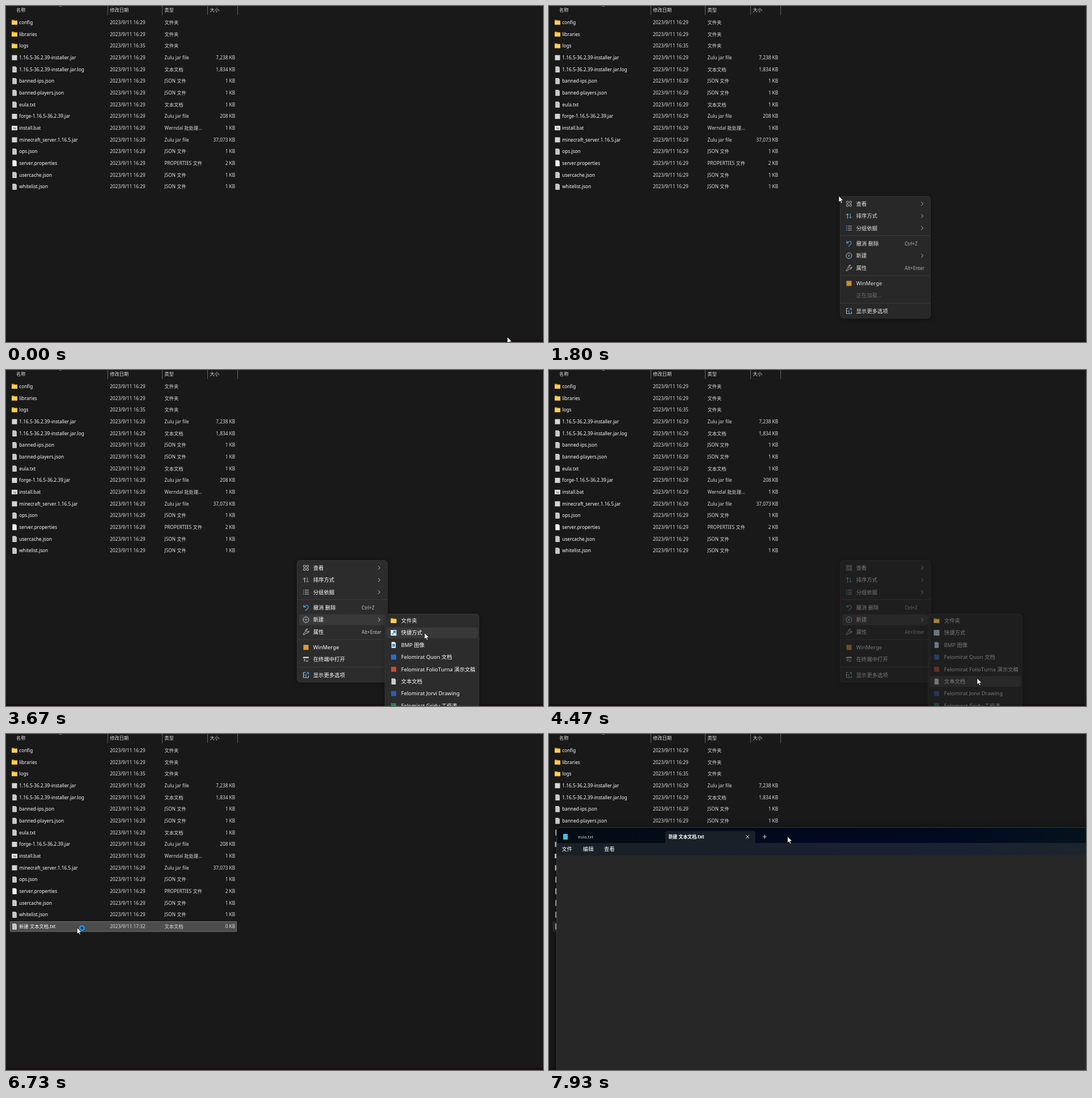
Animation, 947 px wide and 592 px high, one loop 8 s. Source, as an HTML page with a canvas:

```html
<!DOCTYPE html>
<html>
<head>
<meta charset="utf-8">
<style>
html, body { margin: 0; width: 100%; height: 100%; overflow: hidden; background: #191919; }
canvas { display: block; }
</style>
</head>
<body>
<canvas id="stage" width="947" height="592"></canvas>
<script>
const ctx = document.getElementById('stage').getContext('2d');
const LOOP = 8000, STEP = 1000 / 15;
const FONT = '"Noto Sans", "Noto Sans CJK SC", "Noto Sans CJK", sans-serif';
const BLUE = '#4cb8f0', LIGHT = '#d0d0d0';
ctx.fontKerning = 'none';

// ---------- helpers ----------
function text(str, x, y, size, color = '#fff', align = 'left', weight = 400) {
  ctx.font = `${weight} ${size}px ${FONT}`;
  ctx.fillStyle = color;
  ctx.textAlign = align;
  ctx.fillText(str, x, y + size * 0.36);
}
function box(x, y, w, h, fill, radius = 0, border) {
  ctx.beginPath();
  ctx.roundRect(x, y, w, h, radius);
  if (fill) { ctx.fillStyle = fill; ctx.fill(); }
  if (border) { ctx.strokeStyle = border; ctx.lineWidth = 1; ctx.stroke(); }
}
function path(x, y, d, stroke, fill, width = 1) {
  const shape = new Path2D(d);
  ctx.save();
  ctx.translate(x, y);
  if (fill) { ctx.fillStyle = fill; ctx.fill(shape); }
  if (stroke) { ctx.strokeStyle = stroke; ctx.lineWidth = width; ctx.stroke(shape); }
  ctx.restore();
}
const clamp01 = v => Math.max(0, Math.min(1, v));
const easeOut = p => 1 - (1 - clamp01(p)) ** 3;

// ---------- icons, centred on x, y ----------
const square = color => (x, y) => box(x - 4.5, y - 4.5, 9, 9, color);
const icons = {
  folder(x, y) {
    path(x, y, 'M-5-4.5H-1L0-3.5H5V4H-5Z', null, '#e0a526');
    box(x - 5, y - 2.5, 10, 6.5, '#ffd04f', 0.8);
  },
  blank(x, y) { path(x, y, 'M-3.7-5.3H1.8L3.8-3.3V5.2H-3.7Z', null, '#f2f2f2'); },
  doc(x, y) {
    path(x, y, 'M-3.7-5.3H1.8L3.8-3.3V5.2H-3.7Z', null, '#dcdcdc');
    path(x, y, 'M-2.3-3H2M-2.3-1H2.3M-2.3 1H2.3M-2.3 3H2.3', '#a2a2a2', null, 0.8);
  },
  jar: square('#d5d5d5'),
  bat(x, y) {
    box(x - 5, y - 4, 10, 8, '#e4e4e4', 0.5);
    box(x - 4, y - 2.5, 8, 5.5, '#cfd6da');
    path(x, y, 'M-2-1L1 2M1.5-.5V2', '#666');
  },
  view(x, y) {
    for (const dx of [-4.5, 1]) for (const dy of [-4.5, 1])
      box(x + dx, y + dy, 3.5, 3.5, null, 1, LIGHT);
  },
  sort(x, y) {
    path(x, y, 'M-2.5 4.5V-4M-5-1.5L-2.5-4L0-1.5', LIGHT);
    path(x, y, 'M2.5-4.5V4M0 1.5L2.5 4L5 1.5', BLUE);
  },
  group(x, y) {
    path(x, y, 'M-2-3.5H5M-2 0H5M-2 3.5H5', LIGHT);
    path(x, y, 'M-5-3.5H-3.5M-5 0H-3.5M-5 3.5H-3.5', BLUE, null, 1.4);
  },
  undo(x, y) { path(x, y, 'M-4-5V-1H0M-4-1C0-6 5-4 4 0C3.5 2 1 3.5-1 5', BLUE, null, 1.1); },
  create(x, y) {
    path(x, y, 'M5 0A5 5 0 1 1-5 0A5 5 0 1 1 5 0', LIGHT);
    path(x, y, 'M-2.5 0H2.5M0-2.5V2.5', BLUE);
  },
  wrench(x, y) {
    path(x, y, 'M3-5L1-3V-1L2 0H3.5L5-2C5.5 1 3 3 .5 2L-3 5C-5 5.5-5.5 4-4.5 3L-1 0C-2-3 0-5.5 3-5Z', LIGHT);
  },
  merge: square('#dd9a35'),
  terminal(x, y) {
    box(x - 5, y - 4.5, 10, 9, '#3a3a3a', 1);
    path(x, y, 'M-5-3.5H5', '#e8e8e8', null, 2);
    path(x, y, 'M-3.5-1L-1.5 1L-3.5 3M0 3H3.5', '#f0f0f0');
  },
  more(x, y) {
    path(x, y, 'M-1-4.5H-4.5V4.5H4.5V1', LIGHT);
    path(x, y, 'M1-4.5H4.5V-1M4.5-4.5L0 0M-4.5 0H0V4.5', BLUE);
  },
  shortcut(x, y) {
    box(x - 5, y - 5, 10, 10, '#f4f8fb', 0.5);
    path(x, y, 'M-3 3L2.5-2.5M-1-3H3V1', '#1688d8', null, 1.6);
  },
  image(x, y) {
    icons.blank(x, y);
    box(x - 2.5, y - 2, 5, 5, '#3b93d4');
  },
  blueApp: square('#2b6cc4'),
  redApp: square('#d0492c'),
  navyApp: square('#315bb0'),
  greenApp: square('#1f8a50'),
  zip: square('#3ba4c9'),
  editor: (x, y) => box(x - 4, y - 5, 8, 10, '#43bfe3')
};

// ---------- file list ----------
const NEW_NAME = '新建 文本文档.txt';
const KINDS = {
  folder: '文件夹', jar: 'Zulu jar file', txt: '文本文档', json: 'JSON 文件',
  bat: 'Werndal 批处理...', blank: 'PROPERTIES 文件'
};
const FILES = [
  ['config', 'folder'], ['libraries', 'folder'], ['logs', 'folder', '', '16:35'],
  ['1.16.5-36.2.39-installer.jar', 'jar', '7,238'],
  ['1.16.5-36.2.39-installer.jar.log', 'txt', '1,834'],
  ['banned-ips.json', 'json', '1'], ['banned-players.json', 'json', '1'],
  ['eula.txt', 'txt', '1'], ['forge-1.16.5-36.2.39.jar', 'jar', '208'],
  ['install.bat', 'bat', '1'], ['minecraft_server.1.16.5.jar', 'jar', '37,073'],
  ['ops.json', 'json', '1'], ['server.properties', 'blank', '2'],
  ['usercache.json', 'json', '1'], ['whitelist.json', 'json', '1']
];
const SMALL = 8.25;

function drawRow([name, kind, size, time = '16:29'], index) {
  const y = 29 + index * 20.68;
  (icons[kind] || icons.doc)(15, y);
  text(name, 23.3, y, SMALL);
  text('2023/9/11 ' + time, 183.3, y, SMALL, '#dedede');
  text(KINDS[kind], 279.5, y, SMALL, '#dedede');
  if (size) text(size + ' KB', 404, y, SMALL, '#dedede', 'right');
}

function drawExplorer(t) {
  box(0, 0, 947, 592, '#191919');
  box(0, 588.5, 947, 3.5, '#170f13');
  [['名称', 18], ['修改日期', 183.3], ['类型', 279.5], ['大小', 359.5]]
    .forEach(([label, x]) => text(label, x, 7, SMALL, '#dedede'));
  for (const x of [179, 275, 355, 408]) box(x, 0, 1, 16, '#636363');
  box(94, 0, 4, 0.8, '#999');
  FILES.forEach(drawRow);
  if (t < 4730) return;

  const opened = t >= 6730 && t < 6930;
  if (opened) box(7.5, 330.5, 399, 17.5, '#4d4d4d', 0, '#707070');
  else box(7, 330.5, 400, 18, t >= 6930 ? '#303030' : '#383838');
  drawRow([NEW_NAME, 'txt', '0', '17:32'], 15);
  if (t < 5800) {
    box(21.5, 332.5, 75, 14, '#191919', 0, '#f0f0f0');
    box(23, 334, 51, 11.5, '#0078d7');
    text(NEW_NAME, 22.7, 339.2, SMALL);
  }
}

// ---------- context menu ----------
const MENU = [
  [348.5, 'view', '查看', '>'], [370, 'sort', '排序方式', '>'], [391.3, 'group', '分组依据', '>'],
  [418.7, 'undo', '撤消 删除', 'Ctrl+Z'], [440, 'create', '新建', '>'],
  [461.5, 'wrench', '属性', 'Alt+Enter'], [488.7, 'merge', 'WinMerge'],
  [510, 'terminal', '在终端中打开'], [537.4, 'more', '显示更多选项']
];
const SUBMENU = [
  ['folder', '文件夹'], ['shortcut', '快捷方式'], ['image', 'BMP 图像'],
  ['blueApp', 'Felomirat Quon 文档'], ['redApp', 'Felomirat FolioTurna 演示文稿'],
  ['doc', '文本文档'], ['navyApp', 'Felomirat Jorvi Drawing'],
  ['greenApp', 'Felomirat Gridu 工作表'], ['zip', '柚折压缩 ZIP 文件']
];
const MENU_SIZE = 9.35, SUB_OPEN = 3060, HOVER = '#393939';

function panel(x, y, w, h) {
  ctx.save();
  ctx.shadowColor = 'rgba(0,0,0,.35)';
  ctx.shadowBlur = 8;
  ctx.shadowOffsetY = 2;
  box(x, y, w, h, '#2c2c2c', 5);
  ctx.restore();
  box(x, y, w, h, null, 5, '#363636');
}

function drawMenu(t, [mx, my]) {
  if (t < 1795 || t >= 4530) return;
  const loading = t < 1865, subOpen = t >= SUB_OPEN;
  ctx.globalAlpha = loading ? 0.88 : t >= 4460 ? 0.4 : 1;
  panel(513.5, 335.5, 159, 214.5);
  for (const y of [404, 474.5, 523]) box(514, y, 158, 1, '#3c3c3c');
  for (const [y, icon, label, hint] of MENU) {
    const hovered = subOpen ? icon === 'create' : mx > 515 && Math.abs(my - y) < 10.6;
    if (hovered) box(517, y - 9.5, 151, 19, HOVER, 2.5);
    if (loading && icon === 'terminal') {
      text('正在加载...', 541.7, y, MENU_SIZE, '#757575');
      continue;
    }
    icons[icon](529, y);
    text(label, 541.7, y, MENU_SIZE);
    if (hint === '>') path(658, y, 'M-1.7-3.2L1.7 0L-1.7 3.2', LIGHT);
    else if (hint) text(hint, 627.3, y + 0.5, 8, '#c4c4c4');
  }
  if (subOpen) drawSubmenu(t, mx, my);
  ctx.globalAlpha = 1;
}

function drawSubmenu(t, mx, my) {
  const shift = -66 * (1 - easeOut((t - SUB_OPEN - 15) / 260));
  panel(668.5, 430, 165.5, 194 + shift);
  ctx.save();
  ctx.beginPath();
  ctx.rect(668, 430, 167, 194 + shift);
  ctx.clip();
  SUBMENU.forEach(([icon, label], i) => {
    const y = 441.7 + 21.4 * i + shift;
    if (mx > 669 && Math.abs(my - y) < 10.7) box(671, y - 9.5, 161, 19, HOVER, 2.5);
    icons[icon](683.5, y);
    text(label, 696.8, y, MENU_SIZE);
  });
  ctx.restore();
}

// ---------- text editor window ----------
function gradient(...colors) {
  const g = ctx.createLinearGradient(13, 0, 947, 0);
  colors.forEach((c, i) => g.addColorStop(i / (colors.length - 1), c));
  return g;
}

function drawEditor(t) {
  if (t < 6930) return;
  const grow = easeOut((t - 6860) / 270), scale = 0.94 + 0.06 * grow;
  ctx.save();
  ctx.globalAlpha = grow;
  ctx.translate(520, 430);
  ctx.scale(scale, scale);
  ctx.translate(-520, -430);
  ctx.save();
  ctx.shadowColor = 'rgba(0,0,0,.5)';
  ctx.shadowBlur = 12;
  box(13, 164, 1000, 500, '#272727', 6);
  ctx.restore();
  box(13, 164, 1000, 28, gradient('#040d14', '#030b18', '#010820', '#010a20', '#04121c'), [6, 0, 0, 0]);
  box(13, 192, 1000, 22, gradient('#1a2027', '#1a2029', '#1a2030', '#1a2133', '#1c242b'));
  box(205, 171, 159, 21, '#1a2028', [4, 4, 0, 0]);
  box(13.5, 164.5, 1000, 500, null, 6, '#343a3e');
  icons.editor(29, 181);
  text('eula.txt', 51, 181.3, 7.7, '#d0d0d0');
  text(NEW_NAME, 210.7, 181.3, 7.9, '#fff', 'left', 600);
  path(350, 181, 'M-2.8-2.8L2.8 2.8M2.8-2.8L-2.8 2.8', '#e8e8e8');
  path(380.5, 181, 'M-3.5 0H3.5M0-3.5V3.5', '#d0d0d0');
  ['文件', '编辑', '查看'].forEach((label, i) => text(label, 22.5 + 37.3 * i, 202.8, MENU_SIZE));
  ctx.restore();
}

// ---------- pointer ----------
const ROUTE = [
  [0, 884, 583], [300, 690, 370], [600, 500, 176], [700, 486, 184], [867, 495, 245],
  [1200, 511, 334.5], [2133, 511, 334.5], [2400, 528, 362], [2700, 562, 452],
  [2933, 576, 441], [3270, 576, 441], [3500, 680, 446], [3667, 738, 463],
  [3867, 749, 492], [4133, 755, 543], [4667, 755, 543], [5000, 500, 430],
  [5267, 237.5, 354.5], [5467, 107, 342], [6067, 107, 342], [6400, 125.3, 341],
  [6800, 125.3, 341], [7130, 230, 245], [7533, 357, 190], [7933, 420.7, 180.5], [8000, 420.7, 180.5]
];
const slope = (i, k) => i < 0 || i > ROUTE.length - 2 ? 0
  : (ROUTE[i + 1][k] - ROUTE[i][k]) / (ROUTE[i + 1][0] - ROUTE[i][0]);
function tangent(i, k) {
  const a = slope(i - 1, k), b = slope(i, k);
  return a * b > 0 ? 2 * a * b / (a + b) : 0;
}
// Monotone cubic interpolation: smooth, without overshooting at rests.
function pointerAt(t) {
  const i = Math.max(0, ROUTE.findIndex(p => p[0] > t) - 1);
  const span = ROUTE[i + 1][0] - ROUTE[i][0], s = (t - ROUTE[i][0]) / span;
  return [1, 2].map(k => {
    const a = ROUTE[i][k], b = ROUTE[i + 1][k];
    return a + (b - a) * s * s * (3 - 2 * s)
      + span * s * (1 - s) * (tangent(i, k) * (1 - s) - tangent(i + 1, k) * s);
  });
}
function drawPointer(t, [x, y]) {
  path(x, y, 'M0 0V11.3L2.6 9L4.4 13L6.2 12.2L4.5 8.3H8Z', '#000', '#fff', 0.7);
  if (t >= 6730 && t < 7200)
    path(x + 8.7, y + 1, 'M3.9 0A3.9 3.9 0 1 1-3.9 0A3.9 3.9 0 1 1 3.9 0', '#2196e8', '#0c4b80', 2.4);
}

// Time advances in steps of a fifteenth of a second.
function render(now) {
  const t = Math.floor((now % LOOP) / STEP + 0.1) % 120 * STEP;
  const stamp = t + 4;
  const pointer = pointerAt(t);
  drawExplorer(stamp);
  drawMenu(stamp, pointer);
  drawEditor(stamp);
  drawPointer(stamp, pointer);
}
const start = performance.now();
function tick() {
  render(performance.now() - start);
  requestAnimationFrame(tick);
}
tick();
</script>
</body>
</html>
```
